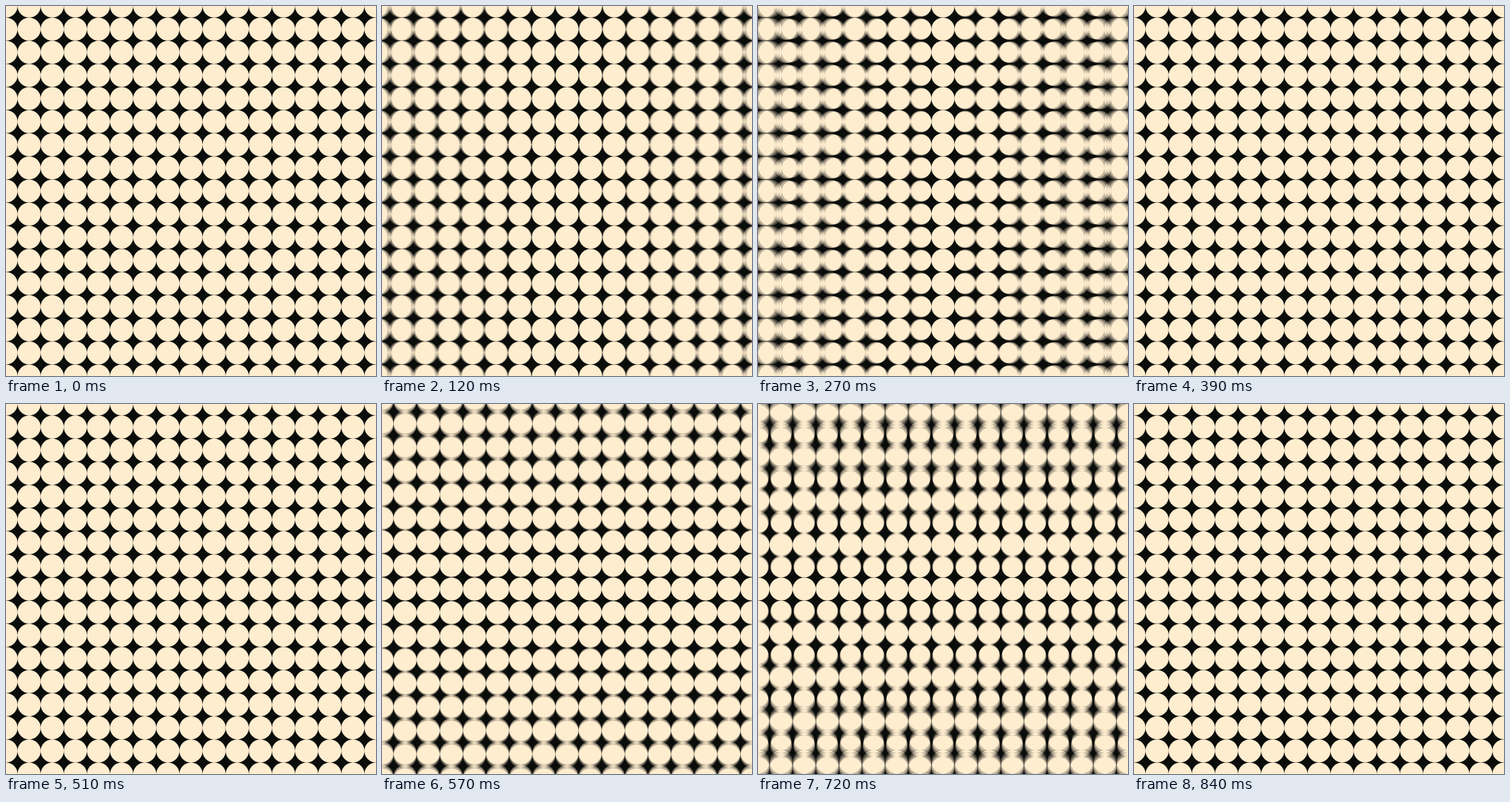
Recreate the animation shown at these times as an HTML page with a canvas. Size 500 by 500 pixels, loop 900 ms.

```html
<!DOCTYPE html>
<html lang="en">
<head>
<meta charset="utf-8">
<title>Splitting dots</title>
<style>
  html, body { margin: 0; width: 100%; height: 100%; overflow: hidden; background: rgb(11, 13, 11); }
  canvas { display: block; width: 500px; height: 500px; }
</style>
</head>
<body>
<canvas id="stage" width="500" height="500"></canvas>
<script>
const ctx = document.getElementById("stage").getContext("2d");
const SIZE = 500;
const CENTER = SIZE / 2;
const GAP = SIZE / 16;
const RADIUS = 15.6;
const FRAME_MS = 30;
const HALF_FRAMES = 15;
const SAMPLES = 4;
const BACKGROUND = "rgb(11, 13, 11)";
const DOT_LIGHT = "rgb(244, 224, 196)"; // added to the background gives the cream

function ease(t, power) {
  return t < 0.5
    ? 0.5 * (2 * t) ** power
    : 1 - 0.5 * (2 - 2 * t) ** power;
}

// Lines of dots spread to twice their spacing while new lines grow between them.
function addDots(progress, vertical) {
  for (let i = -18; i <= 18; i++) {
    const along = CENTER + (i / 2) * GAP * (1 + progress);
    const r = i % 2 ? RADIUS * progress : RADIUS;
    if (along < -r || along > SIZE + r) continue;
    for (let j = -8; j <= 8; j++) {
      const across = CENTER + j * GAP;
      const [x, y] = vertical ? [across, along] : [along, across];
      ctx.moveTo(x + r, y);
      ctx.arc(x, y, r, 0, 2 * Math.PI);
    }
  }
}

function draw(frame) {
  const vertical = frame >= HALF_FRAMES;
  const start = frame % HALF_FRAMES;

  ctx.globalCompositeOperation = "source-over";
  ctx.globalAlpha = 1;
  ctx.fillStyle = BACKGROUND;
  ctx.fillRect(0, 0, SIZE, SIZE);

  // Motion blur: the average of several moments within the frame.
  ctx.globalCompositeOperation = "lighter";
  ctx.globalAlpha = 1 / SAMPLES;
  ctx.fillStyle = DOT_LIGHT;
  for (let s = 0; s < SAMPLES; s++) {
    ctx.beginPath();
    addDots(ease((start + s / SAMPLES) / HALF_FRAMES, 6), vertical);
    ctx.fill();
  }
}

const origin = performance.now();

function tick() {
  const elapsed = performance.now() - origin;
  draw(Math.floor(elapsed / FRAME_MS) % (2 * HALF_FRAMES));
  requestAnimationFrame(tick);
}

tick();
</script>
</body>
</html>
```
